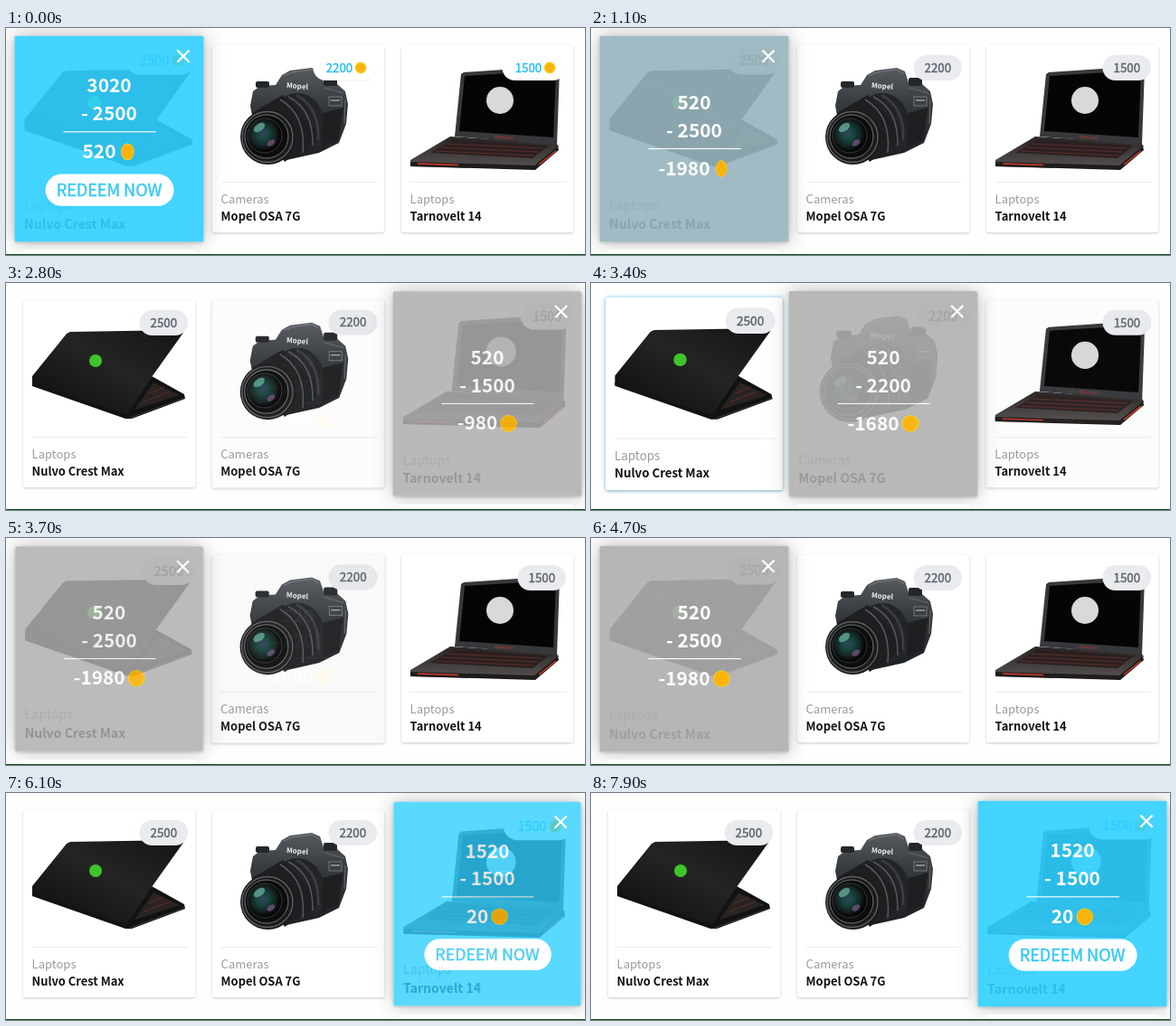
Animation of 640x251 px, one loop 8 s. Source, as an HTML page:

```html
<!DOCTYPE html>
<html lang="en">
<head>
<meta charset="utf-8">
<title>Rewards</title>
<style>
  html, body { margin: 0; width: 100%; height: 100%; overflow: hidden; background: #fefefe; }
  body { position: relative; font-family: "Noto Sans CJK JP", "Noto Sans CJK SC", "Noto Sans CJK", sans-serif; }
  .card { position: absolute; top: 19px; width: 190px; height: 207px; background: #fff; border-radius: 2px; }
  .card svg { position: absolute; left: 0; top: 0; display: block; }
  .next { position: absolute; top: 245px; width: 190px; height: 6px; background: #fff; z-index: 20; }
  .edge { position: absolute; left: 0; top: 250px; width: 640px; height: 1px; background: #0a4a10; z-index: 21; }
  .cover { position: absolute; inset: 0; border-radius: 2px; color: #fff; }
  .sum { position: absolute; left: 0; width: 100%; top: 0; }
  .row { position: absolute; left: 0; width: 100%; height: 24px; line-height: 24px; display: flex;
    justify-content: center; align-items: center; font-size: 19px; font-weight: 600; white-space: pre; }
  .rule { position: absolute; left: 49px; top: 96px; width: 93px; height: 1px; background: #fff; }
  .coin { width: 15px; height: 15px; margin: 2px 0 0 3px; border: 1.5px solid #ffcb1f; border-radius: 50%; background: #f9b30c; }
  .button { position: absolute; left: 30.5px; top: 139.4px; width: 129px; height: 32px; line-height: 30px; border-radius: 16px;
    background: #fff; color: #35c8f5; text-align: center; font-size: 16.4px; -webkit-text-stroke: .4px #35c8f5; white-space: nowrap; }
  .kind { font-size: 13px; fill: #9a9a9a; }
  .name { font-size: 12.9px; font-weight: 600; fill: #111; }
  .price { font-size: 13.3px; stroke-width: .4; text-anchor: middle; }
</style>
</head>
<body>
<script>
const LOOP = 8000, STEP = 209, LEFT = 19, TOP = 19;

const poly = (points, fill, more = '') => `<polygon points="${points}" fill="${fill}" ${more}/>`;
const disc = (x, y, r, fill, more = '') => `<circle cx="${x}" cy="${y}" r="${r}" fill="${fill}" ${more}/>`;
const box = (x, y, w, h, fill, more = '') => `<rect x="${x}" y="${y}" width="${w}" height="${h}" fill="${fill}" ${more}/>`;
const line = (d, color, w = 1) => `<path d="${d}" fill="none" stroke="${color}" stroke-width="${w}"/>`;
const price = (x, value, color) =>
  `<text class="price" x="${x}" y="48.8" fill="${color}" stroke="${color}">${value}</text>`;

const darkLaptop = `
  <defs><linearGradient id="lid" x1="0" y1="1" x2="1" y2="0">
    <stop offset="0" stop-color="#0c0c0c"/><stop offset=".55" stop-color="#242424"/><stop offset="1" stop-color="#151515"/>
  </linearGradient></defs>
  ${poly('29,110 135,140 161,103 197,123 198,128 139,150 132,150 29,114', '#121212')}
  ${poly('142,140 163,110 192,124', '#292422')}
  ${line('M153 131L182 120M158 122L175 115', '#5a2c24')}
  ${line('M137 149L198 127', '#3a3a3a')}
  ${poly('29,113 29,103 67,56 71,54 193,52 196,55 161,104 134,145', 'url(#lid)')}
  ${disc(99, 86, 7, '#3fc42b')}`;

const camera = `
  <defs><radialGradient id="glass" cx=".45" cy=".45">
    <stop offset="0" stop-color="#34455a"/><stop offset=".35" stop-color="#17453f"/>
    <stop offset=".75" stop-color="#14201f"/><stop offset="1" stop-color="#060606"/>
  </radialGradient>
  <linearGradient id="shell" x1="0" y1="0" x2="0" y2="1">
    <stop offset="0" stop-color="#565b60"/><stop offset=".4" stop-color="#363a3f"/><stop offset="1" stop-color="#1d1f22"/>
  </linearGradient></defs>
  <path d="M270 86L273 70L281 64L298 63L305 52L314 47L338 44L347 48L351 60L366 62L375 70L378 84L376 106L368 127L346 138L310 146L276 118Z" fill="url(#shell)"/>
  ${box(351, 55, 15, 9, '#24272a', 'rx="2"')}
  ${box(276, 59, 15, 7, '#24272a', 'rx="2"')}
  ${line('M307 53L316 49L338 46L346 51', '#777b80')}
  ${line('M352 66L373 72M375 80L374 106', '#666a6f')}
  ${poly('350,94 373,88 367,124 349,132', '#1d1f21')}
  <text x="322" y="67" font-size="8" font-weight="700" fill="#eee" text-anchor="middle" transform="rotate(5 322 64)">Mopel</text>
  ${box(357, 76, 14, 10, '#3b3f43', 'stroke="#9a9da1" stroke-width=".6"')}
  ${line('M359 80H369', '#ccc')}
  <ellipse cx="322" cy="104" rx="29" ry="32" fill="#222427"/>
  ${poly('272,94 306,74 349,120 308,148', '#1d1f21')}
  ${line('M312 76Q340 90 339 130M303 79Q332 96 328 138', '#56595d', 1.5)}
  ${line('M321 74Q347 88 345 124', '#3a3c3f', 3)}
  ${disc(289.5, 120.5, 30.5, '#1a1b1c')}
  ${disc(289, 120.5, 28, 'none', 'stroke="#5c5f62" stroke-width="1.4"')}
  ${disc(288, 120, 24, '#0d0d0e', 'stroke="#707376" stroke-width="1"')}
  ${disc(286, 119, 19, 'url(#glass)', 'stroke="#34373a"')}
  <ellipse cx="280" cy="110" rx="7" ry="4" fill="#6fb9a8" opacity=".7" transform="rotate(-35 280 110)"/>
  <ellipse cx="293" cy="127" rx="5" ry="3" fill="#7a5a86" opacity=".7" transform="rotate(-35 293 127)"/>`;

const redLaptop = `
  <defs><linearGradient id="deck" x1="0" y1="0" x2="0" y2="1">
    <stop offset="0" stop-color="#2a2626"/><stop offset="1" stop-color="#575251"/>
  </linearGradient></defs>
  ${poly('447,146 491,120 608,127 611,131 585,156 447,153', 'url(#deck)')}
  ${poly('469,138 494,123 600,130 582,144', '#2a2020')}
  ${[0, 1, 2].map(k => line(`M${487 - k * 6} ${128 + k * 4}L${593 - k * 5} ${133 + k * 4}`, '#63302b', .9)).join('')}
  ${poly('447,148 584,152 610,131 611,135 585,157 447,153', '#1f1c1c')}
  ${line('M455 150L500 151.5', '#d33a2c', 1.3)}
  ${line('M589 151L608 136', '#d33a2c', 1.5)}
  ${poly('503,51 506,49 609,42 612,44 609,129 496,120', '#37383b')}
  ${poly('507,53 608,47 605,121 501,114', '#050505')}
  <text x="550" y="122.6" font-size="4" fill="#c8392c" text-anchor="middle" transform="rotate(4 550 121)">TARNOVELT</text>
  ${disc(546, 80, 15, '#d9d9d9')}`;

// tracks: first value, then [start, target, duration]
const items = [
  { kind: 'Laptops', name: 'Nulvo Crest Max', price: 2500, art: darkLaptop,
    open: [1, [1480, 0], [3420, 1], [5720, 0]], hover: [0, [3200, 1, 180], [3420, 0]],
    pay: [[900, 0]] },
  { kind: 'Cameras', name: 'Mopel OSA 7G', price: 2200, art: camera,
    open: [0, [1480, 1], [2500, 0], [3080, 1], [3420, 0]], hover: [0],
    pay: [[900, 0]] },
  { kind: 'Laptops', name: 'Tarnovelt 14', price: 1500, art: redLaptop,
    open: [0, [2500, 1], [3080, 0], [5850, 1]], hover: [0, [5500, 1, 180], [5850, 0]],
    pay: [[900, 0], [5100, 1]] },
];

const ease = x => 1 - (1 - Math.min(1, x)) ** 2.2;
const track = ([first, ...keys], t, span = 400) => keys.reduce(
  (v, [at, to, dur = span]) => t < at ? v : v + (to - v) * ease((t - at) / dur), first);
const balanceAt = t => t < 900 ? 3020 : t < 5100 ? 520 : 1520;

function build(item, i) {
  const x = LEFT + STEP * i;
  const card = document.createElement('div');
  card.className = 'card';
  card.style.left = x + 'px';
  card.innerHTML = `
    <svg width="190" height="207" viewBox="${x} ${TOP} 190 207">
      ${item.art}
      ${line(`M${x + 10} 170.5H${x + 182}`, '#ececec')}
      <text class="kind" x="${x + 9.6}" y="193.8">${item.kind}</text>
      <text class="name" x="${x + 9.6}" y="212.5">${item.name}</text>
      <g class="poor">
        ${box(x + 128.5, 30, 53.5, 28, '#e9ebef', 'rx="14"')}
        ${price(x + 155.3, item.price, '#5d636b')}
      </g>
      <g class="rich">
        ${box(x + 111.5, 31, 70, 28, '#000', 'rx="14" opacity=".06"')}
        ${box(x + 111.5, 30, 70, 28, '#fff', 'rx="14"')}
        ${price(x + 140.5, item.price, '#27bff0')}
        ${disc(x + 164, 44, 5.7, '#f9b30c', 'stroke="#ffcb1f" stroke-width="1.4"')}
      </g>
    </svg>
    <div class="cover">
      <svg width="190" height="207">${line('M163.5 14.5L175.5 26.5M175.5 14.5L163.5 26.5', '#fff', 2)}</svg>
      <div class="sum">
        <div class="row have" style="top:36.6px"></div>
        <div class="row" style="top:65.4px">- ${item.price}</div>
        <div class="rule"></div>
        <div class="row" style="top:103.2px"><span class="rest"></span><i class="coin"></i></div>
      </div>
      <div class="button">REDEEM NOW</div>
    </div>`;
  const next = document.createElement('div');
  next.className = 'next';
  next.style.left = x + 'px';
  document.body.append(card, next);
  item.card = card;
  for (const part of ['poor', 'rich', 'cover', 'sum', 'have', 'rest', 'coin', 'button'])
    item[part] = card.querySelector('.' + part);
}

function paint(t) {
  const balance = balanceAt(t);
  const turn = Math.min(180, 37 + t * .0855) * Math.PI / 180;
  for (const c of items) {
    const open = track(c.open, t), hover = track(c.hover, t);
    const rich = track([1, ...c.pay], t, 180), tint = track([1, ...c.pay], t, 380);
    const enough = balance >= c.price;
    const mix = (a, b) => Math.round(a + (b - a) * tint);

    c.card.style.transform = `scale(${1 + .1 * open + .03 * hover * (1 - open)})`;
    c.card.style.zIndex = Math.round(open * 10);
    c.card.style.boxShadow = `0 1px 3px rgba(0,0,0,.2), 0 0 20px rgba(0,0,0,${.28 * open}), 0 0 5px rgba(50,185,240,${.6 * hover})`;
    c.rich.style.opacity = rich;
    c.poor.style.opacity = 1 - rich;
    c.cover.style.opacity = open;
    c.cover.style.background = `rgba(${mix(174, 47)},${mix(174, 208)},${mix(174, 255)},.9)`;
    c.sum.style.top = enough ? '0' : '17px';
    c.button.style.display = enough ? '' : 'none';
    c.have.textContent = balance;
    c.rest.textContent = balance - c.price;
    c.coin.style.transform = `scaleX(${Math.abs(Math.cos(turn))})`;
  }
}

items.forEach(build);
const edge = document.createElement('div');
edge.className = 'edge';
document.body.append(edge);

const start = performance.now();
function frame() {
  paint((performance.now() - start) % LOOP);
  requestAnimationFrame(frame);
}
paint(0);
requestAnimationFrame(frame);
</script>
</body>
</html>
```
